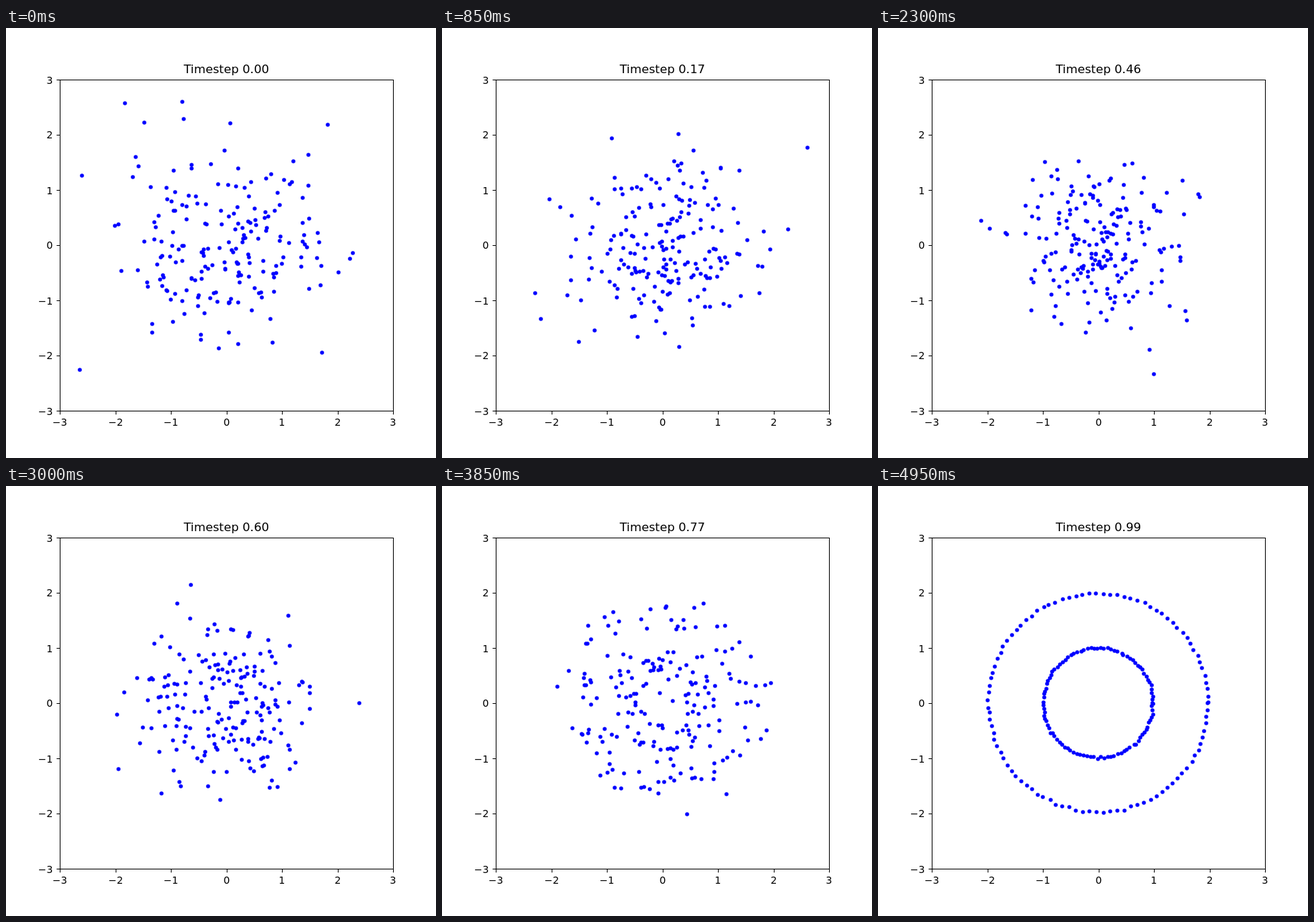
These frames come from a looping animation (600 by 600 pixels, 5000 ms). An HTML page with a canvas:

```html
<!DOCTYPE html>
<html lang="en">
<head>
<meta charset="utf-8">
<title>Noise to circles</title>
<style>
  html, body { margin: 0; height: 100%; overflow: hidden; background: #fff; }
  canvas { display: block; }
</style>
</head>
<body>
<canvas id="stage" width="600" height="600"></canvas>
<script>
const ctx = document.getElementById('stage').getContext('2d');
const LEFT = 75, RIGHT = 540, TOP = 72, BOTTOM = 534;
const STEPS = 100, STEP_MS = 50, PER_RING = 100;
const DOT = 2.78, TICK = 4.86;
const FONT = '"DejaVu Sans", sans-serif';

const toX = x => LEFT + (x + 3) / 6 * (RIGHT - LEFT);
const toY = y => BOTTOM - (y + 3) / 6 * (BOTTOM - TOP);

// Whole and half values only; halves go to the even neighbour
const roundHalfEven = v => v % 1 ? 2 * Math.round(v / 2) : v;

// Seeded uniform numbers (mulberry32)
function makeRandom(seed) {
  return () => {
    seed = seed + 0x6D2B79F5 | 0;
    let n = Math.imul(seed ^ seed >>> 15, 1 | seed);
    n = n + Math.imul(n ^ n >>> 7, 61 | n) ^ n;
    return ((n ^ n >>> 14) >>> 0) / 4294967296;
  };
}

function drawDots(step) {
  const t = step / STEPS;
  const random = makeRandom(step * 7919 + 11);
  ctx.save();
  ctx.beginPath();
  ctx.rect(LEFT, TOP, RIGHT - LEFT, BOTTOM - TOP);
  ctx.clip();
  ctx.fillStyle = '#00f';
  ctx.beginPath();
  for (const radius of [2, 1]) {
    for (let i = 0; i < PER_RING; i++) {
      const angle = 2 * Math.PI * i / (PER_RING - 1);
      // Fresh Gaussian noise each step, blended with the ring point
      const size = Math.sqrt(-2 * Math.log(1 - random()));
      const turn = 2 * Math.PI * random();
      const x = t * radius * Math.cos(angle) + (1 - t) * size * Math.cos(turn);
      const y = t * radius * Math.sin(angle) + (1 - t) * size * Math.sin(turn);
      const px = Math.round(toX(x)), py = Math.round(toY(y));
      ctx.moveTo(px + DOT, py);
      ctx.arc(px, py, DOT, 0, 2 * Math.PI);
    }
  }
  ctx.fill();
  ctx.restore();
}

function drawAxes() {
  ctx.strokeStyle = ctx.fillStyle = '#000';
  ctx.lineWidth = 1;
  ctx.font = '13.89px ' + FONT;
  ctx.strokeRect(LEFT + 0.5, TOP + 0.5, RIGHT - LEFT, BOTTOM - TOP);
  ctx.beginPath();
  for (let v = -3; v <= 3; v++) {
    const x = Math.round(toX(v)), y = Math.round(toY(v));
    const label = String(v).replace('-', '\u2212');
    ctx.moveTo(x + 0.5, BOTTOM + 0.5);
    ctx.lineTo(x + 0.5, BOTTOM + 0.5 + TICK);
    ctx.moveTo(LEFT + 0.5, y + 0.5);
    ctx.lineTo(LEFT + 0.5 - TICK, y + 0.5);
    ctx.textAlign = 'center';
    ctx.fillText(label, x, 555);
    ctx.textAlign = 'right';
    ctx.fillText(label, 65.3, roundHalfEven(y + 5.5));
  }
  ctx.stroke();
}

function drawTitle(step) {
  ctx.font = '16.67px ' + FONT;
  ctx.textAlign = 'center';
  ctx.fillText('Timestep ' + (step / STEPS).toFixed(2), (LEFT + RIGHT) / 2, 63);
}

function render() {
  const step = Math.floor(performance.now() / STEP_MS) % STEPS;
  ctx.fillStyle = '#fff';
  ctx.fillRect(0, 0, 600, 600);
  drawDots(step);
  drawAxes();
  drawTitle(step);
  requestAnimationFrame(render);
}
render();
</script>
</body>
</html>
```
